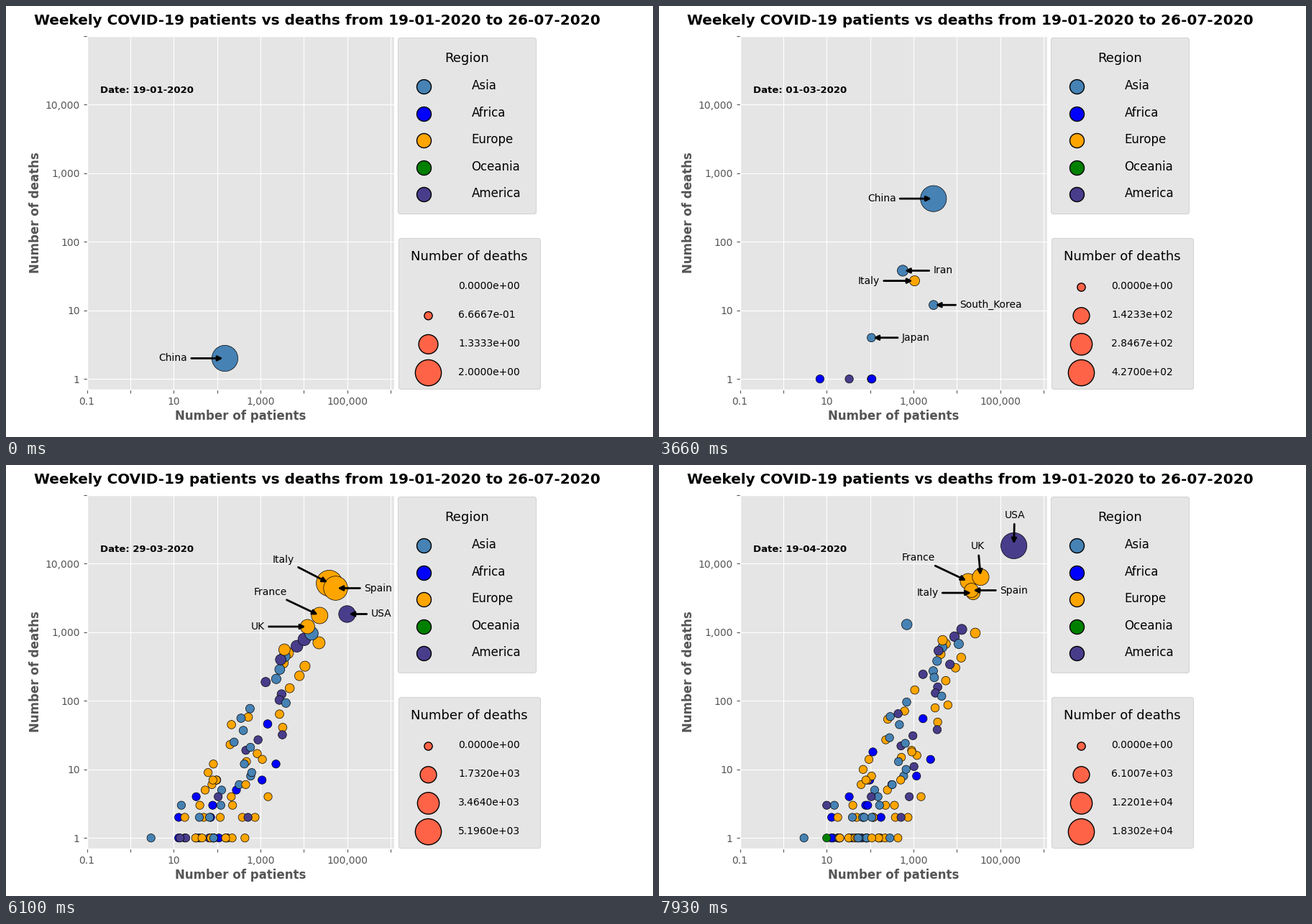
A matplotlib script for the animation above (8000 ms loop, 900 px wide and 600 px high).

```python
import matplotlib.pyplot as plt
import numpy as np
from matplotlib.animation import FuncAnimation
from matplotlib.patches import FancyBboxPatch

LOOP, HOLD, STEP = 8000, 610, 40          # ms
WEEKS = 14
GREY = "#E5E5E5"
COLORS = {"Asia": "steelblue", "Africa": "blue", "Europe": "orange",
          "Oceania": "green", "America": "darkslateblue"}
REGIONS = list(COLORS)
ABOVE = (0.6, 2.8)


class Country:
    """Follows key points (week, patients, deaths) in log space.

    places: label positions as factors of (patients, deaths), best first.
    lift: number of patients above which the label sits overhead.
    """

    def __init__(self, name, region, places, points, lift=np.inf):
        self.name, self.region = name, region
        self.places, self.lift = places, lift
        self.weeks, *values = np.array(points, float).T
        self.logs = np.log10(values)

    def at(self, week):
        if not self.weeks[0] <= week <= self.weeks[-1]:
            return None
        return 10 ** np.array([np.interp(week, self.weeks, v) for v in self.logs])


COUNTRIES = [
    Country("China", "Asia", [(0.03, 1)],
            [(0, 151, 2), (1, 1900, 54), (2, 12500, 250), (4, 31200, 854),
             (6, 2880, 427), (8, 181, 104), (12, 700, 30), (13, 700, 1300)]),
    Country("Philippines", "Asia", [(5, 1)], [(2, 3, 1)]),
    Country("Japan", "Asia", [(5, 1)], [(4, 27, 1), (6, 107, 4), (8, 105, 7)]),
    Country("South_Korea", "Asia", [(4, 1)],
            [(5, 570, 5), (6, 2890, 12), (8, 1030, 25)]),
    Country("Iran", "Asia", [(5, 1)],
            [(5, 43, 8), (6, 565, 38), (8, 6840, 466), (10, 14950, 962),
             (13, 11000, 677)]),
    Country("France", "Europe", [(0.03, 2.2)],
            [(8, 3790, 81), (10, 23000, 1758), (11, 32700, 5390),
             (13, 18100, 5530)]),
    Country("Italy", "Europe", [(0.05, 1), (0.05, 2.2)],
            [(5, 132, 2), (6, 1056, 27), (8, 15230, 1208), (10, 38300, 5196),
             (11, 33300, 5290), (13, 23600, 3757)]),
    Country("Spain", "Europe", [(4.5, 1), (2.6, 0.34)],
            [(7, 400, 5), (8, 8600, 131), (10, 53700, 4397),
             (11, 48700, 6020), (13, 21500, 4090)]),
    Country("UK", "Europe", [(0.05, 1)],
            [(8, 1200, 13), (10, 12100, 1210), (11, 24500, 3757),
             (13, 35200, 6385)], lift=3e4),
    Country("USA", "America", [(3.5, 1)],
            [(6, 33, 1), (8, 2540, 40), (10, 98700, 1845), (11, 188000, 6310),
             (13, 205000, 18302)], lift=1e5),
]

# The other countries keep a region, a rank and a spread for the whole loop
CROWD = 116
rng = np.random.default_rng(19)
crowd_region = rng.choice(REGIONS, CROWD, p=[0.25, 0.19, 0.36, 0.02, 0.18])
rank = rng.permutation(CROWD) / CROWD
rank *= np.where(crowd_region == "Africa", 0.75, 1)
rank *= np.where(crowd_region == "Oceania", 0.6, 1)
spread = np.clip(rng.normal(size=CROWD), -1.9, 1.7)


def crowd_at(week):
    """Regions, patients and deaths of the unlabelled countries."""
    n = round(CROWD / (1 + np.exp(1.2 * (9 - week))))
    peak = np.clip(0.75 * (week - 6), 0, 3.15)
    deaths = np.round(10 ** (peak * rank[:n] ** 2))
    log_d = np.log10(deaths)
    log_p = 1.75 + 0.75 * log_d + spread[:n] * (0.65 - 0.13 * log_d)
    return list(crowd_region[:n]), np.round(10 ** log_p), deaths


plt.style.use("ggplot")
fig = plt.figure(figsize=(9, 6), dpi=100)

# Chart
ax = fig.add_axes([0.125, 0.11, 0.475, 0.82])
ax.set(xscale="log", yscale="log", xlim=(0.1, 1.2e6), ylim=(0.7, 1e5))
x_ticks = 10.0 ** np.arange(-1, 7)
y_ticks = 10.0 ** np.arange(6)
ax.set_xticks(x_ticks, ["" if i % 2 else f"{t:,g}" for i, t in enumerate(x_ticks)])
ax.set_yticks(y_ticks, [f"{t:,g}" if t < 1e5 else "" for t in y_ticks])
ax.minorticks_off()
ax.set_xlabel("Number of patients", weight="bold", labelpad=3.3)
ax.set_ylabel("Number of deaths", weight="bold", labelpad=3.3)
fig.text(433.3 / 900, 0.9817,
         "Weekely COVID-19 patients vs deaths from 19-01-2020 to 26-07-2020",
         size=14.4, weight="bold", ha="center", va="top")
date = ax.text(0.2, 15000, "", size=9.5, weight="bold")
dots = ax.scatter([], [], s=[], ec="k", lw=0.5, zorder=3)

# Legends, measured in stage pixels from the top left
stage = fig.add_axes([0, 0, 1, 1], xlim=(0, 900), ylim=(600, 0))
stage.axis("off")


def panel(x0, y0, x1, y1, title, title_y):
    stage.add_patch(FancyBboxPatch(
        (x0 + 3, y0 + 3), x1 - x0 - 6, y1 - y0 - 6,
        boxstyle="round,pad=3,rounding_size=3", fc=GREY, ec="#D4D4D4", lw=0.8))
    stage.text((x0 + x1) / 2 - 0.7, title_y, title, size=13, ha="center")


panel(545.5, 44.5, 737.5, 289.5, "Region", 78.5)
for i, (region, color) in enumerate(COLORS.items()):
    y = 112.3 + 37.5 * i
    stage.scatter(580.9, y, s=207, c=color, ec="k", lw=1)
    stage.text(647.5, y + 3.8, region, size=12)

panel(546.5, 323.5, 743.5, 533.5, "Number of deaths", 354.5)
key_y = 391.5 + 39.7 * np.arange(4)
key = stage.scatter([587.5] * 4, key_y, s=1, c="tomato", ec="k")
key_text = [stage.text(629, y + 3, "", size=10) for y in key_y]


def dot_area(share):
    return 66 + 615 * share


def is_clear(spot, obstacles):
    gaps = np.abs(np.log10(obstacles) - np.log10(spot))
    return not np.any((gaps[:, 0] < 0.5) & (gaps[:, 1] < 0.136))


def label_top(found):
    """Hidden labels for the five countries with the most deaths."""
    top = sorted(found, key=lambda item: -item[1][1])[:5]
    taken = [spot for _, spot in top]
    labels = []
    for country, dot in found:
        if country not in [c for c, _ in top]:
            continue
        places = [ABOVE] if dot[0] > country.lift else country.places
        spots = [dot * place for place in places]
        spot = next((s for s in spots if is_clear(s, taken)), spots[-1])
        taken.append(spot)
        labels.append(ax.annotate(
            country.name, dot, spot, size=10, va="center", visible=False,
            zorder=4, arrowprops=dict(arrowstyle="-|>", lw=2, color="k")))
    return labels


def build(week):
    """Dots and labels of one week."""
    found = [(c, c.at(week)) for c in COUNTRIES if c.at(week) is not None]
    regions, patients, deaths = crowd_at(week)
    regions += [c.region for c, _ in found]
    patients = np.append(patients, [dot[0] for _, dot in found])
    deaths = np.append(deaths, [dot[1] for _, dot in found])
    return regions, patients, deaths, label_top(found)


weeks = [build(w) for w in range(WEEKS)]


def show(frame):
    week = min((frame * STEP + STEP - 1) // HOLD, WEEKS - 1)
    regions, patients, deaths, _ = weeks[week]
    top = round(deaths.max())

    dots.set_offsets(np.column_stack([patients, deaths]))
    dots.set_sizes(dot_area(deaths / top))
    dots.set_facecolor([COLORS[r] for r in regions])

    # A lone dot makes the size scale start at a third of its value
    share = np.linspace(-0.5 if len(deaths) == 1 else 0, 1, 4)
    key.set_sizes(np.where(share < 0, 0, dot_area(share)))
    key.set_linewidths(np.where(share < 0, 0, 1.0))
    for i, text in enumerate(key_text):
        text.set_text(f"{top * i / 3:.4e}")

    day = np.datetime64("2020-01-19") + 7 * week
    date.set_text("Date: " + "-".join(str(day).split("-")[::-1]))
    for w, (*_, labels) in enumerate(weeks):
        for label in labels:
            label.set_visible(w == week)
    return [dots, key, date]


anim = FuncAnimation(fig, show, frames=LOOP // STEP, interval=STEP,
                     repeat=True, repeat_delay=0, blit=False)
plt.show()
```
